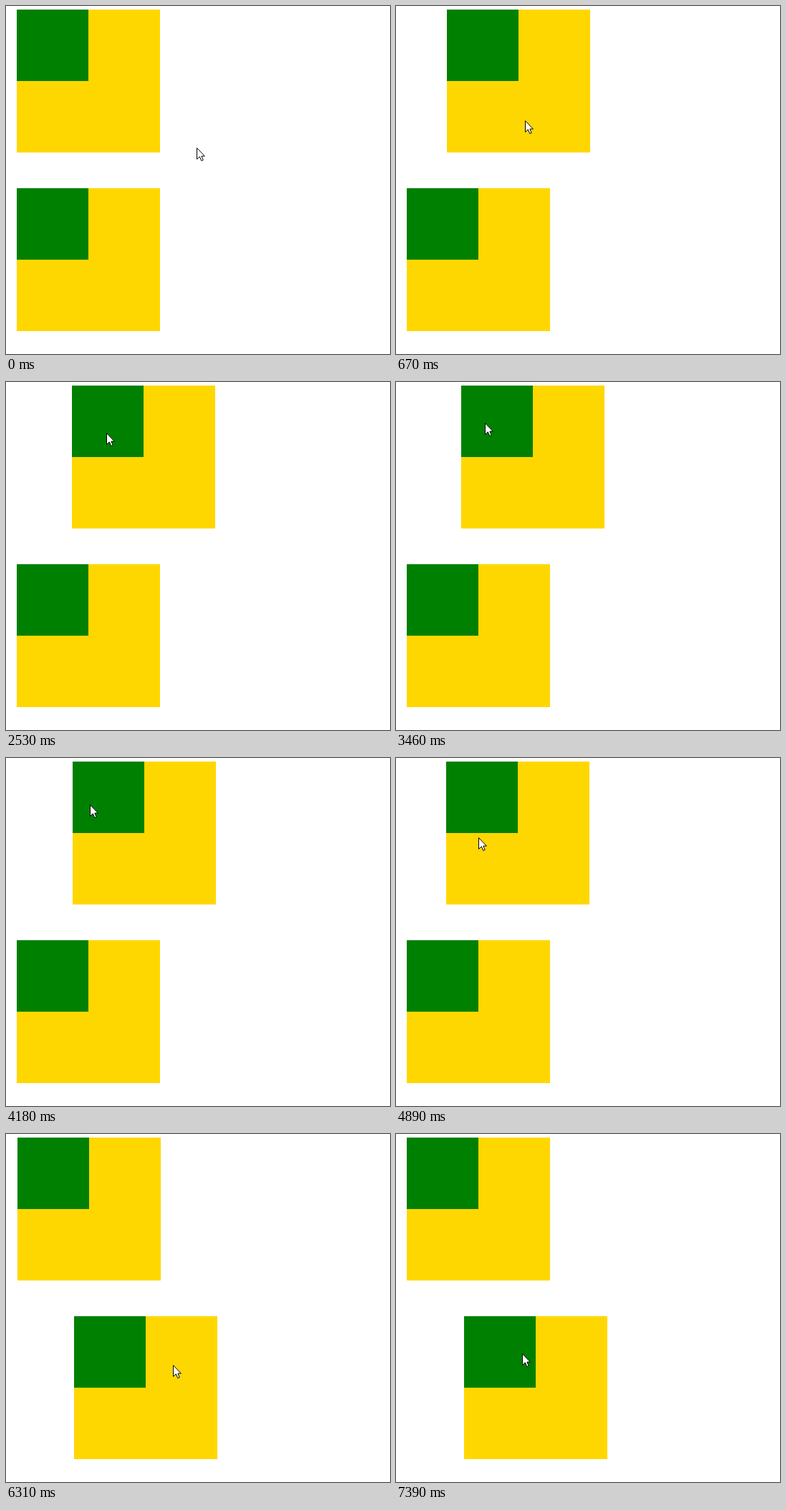
An HTML page for the animation above (8110 ms loop, 536 px wide and 487 px high).

```html
<!DOCTYPE html>
<html lang="en">
<head>
<meta charset="utf-8">
<title>Hover boxes</title>
<style>
html, body { margin: 0; width: 100%; height: 100%; overflow: hidden; background: #fff; }
svg { display: block; }
</style>
</head>
<body>
<svg width="536" height="487">
  <defs>
    <g id="box">
      <path fill="#ffd700" d="M0 0h200v200H0z"/>
      <path fill="#008000" d="M0 0h100v100H0z"/>
    </g>
  </defs>
  <use id="upper" href="#box"/>
  <use id="lower" href="#box"/>
  <path id="pointer" d="M.5 .7V16.4L4.3 12.9 6.8 18.6 9.2 17.6 6.9 12.1H11.4Z" fill="#fff" stroke="#000"/>
</svg>
<script>
const LOOP = 8110;
const SLIDE = 80;

// Screen updates: first time, last time, count
const bursts = [
  [210, 830, 9], [1670, 2450, 11], [2530, 3320, 11], [3380, 4180, 11], [4260, 5050, 11],
  [5130, 5910, 11], [6000, 6780, 11], [6860, 7160, 5], [7330, 7390, 2]
];

// Pointer path: time, x, y
const path = [
  [130, 266, 198], [420, 213, 178], [620, 180, 160], [830, 180, 160], [1670, 180, 158],
  [1750, 172, 112], [1830, 160, 88], [2000, 148, 75], [2530, 140, 71], [3460, 124, 57],
  [4260, 116, 66], [4730, 114, 85], [4890, 115, 111], [5050, 140, 265], [5450, 213, 314],
  [5910, 234, 325], [6310, 233, 323], [6780, 232, 307], [7160, 224, 307], [7390, 176, 307]
];

const $ = id => document.getElementById(id);
const place = (id, x, y) =>
  $(id).setAttribute("transform", `translate(${Math.round(x)} ${Math.round(y)})`);
const clamp = (v, lo, hi) => Math.min(hi, Math.max(lo, v));
const swing = p => SLIDE * (1 - Math.cos(Math.PI * p)) / 2;

function lastUpdate(t) {
  const burst = bursts.findLast(b => b[0] <= t);
  if (!burst) return 0;
  const [start, end, count] = burst;
  const step = (end - start) / (count - 1);
  const n = Math.min(count - 1, Math.floor((t - start + 5) / step));
  return Math.round((start + n * step) / 10) * 10;
}

// One slide out, then 13 queued slides back and forth
function upperShift(t) {
  return t < 1758 ? swing(clamp((t - 420) / 410, 0, 1))
                  : swing(1 + Math.min(13, (t - 1758) / 411));
}

function pointerAt(t) {
  const i = path.findIndex(k => k[0] > t);
  if (i < 0) return path.at(-1).slice(1);
  if (i === 0) return path[0].slice(1);
  const [t0, x0, y0] = path[i - 1], [t1, x1, y1] = path[i];
  const p = (t - t0) / (t1 - t0);
  return [x0 + (x1 - x0) * p, y0 + (y1 - y0) * p];
}

function draw() {
  const t = lastUpdate(performance.now() % LOOP);
  place("upper", 15 + upperShift(t), 5);
  place("lower", 15 + swing(clamp((t - 5045) / 410, 0, 1)), 255);
  place("pointer", ...pointerAt(t));
  requestAnimationFrame(draw);
}
draw();
</script>
</body>
</html>
```
